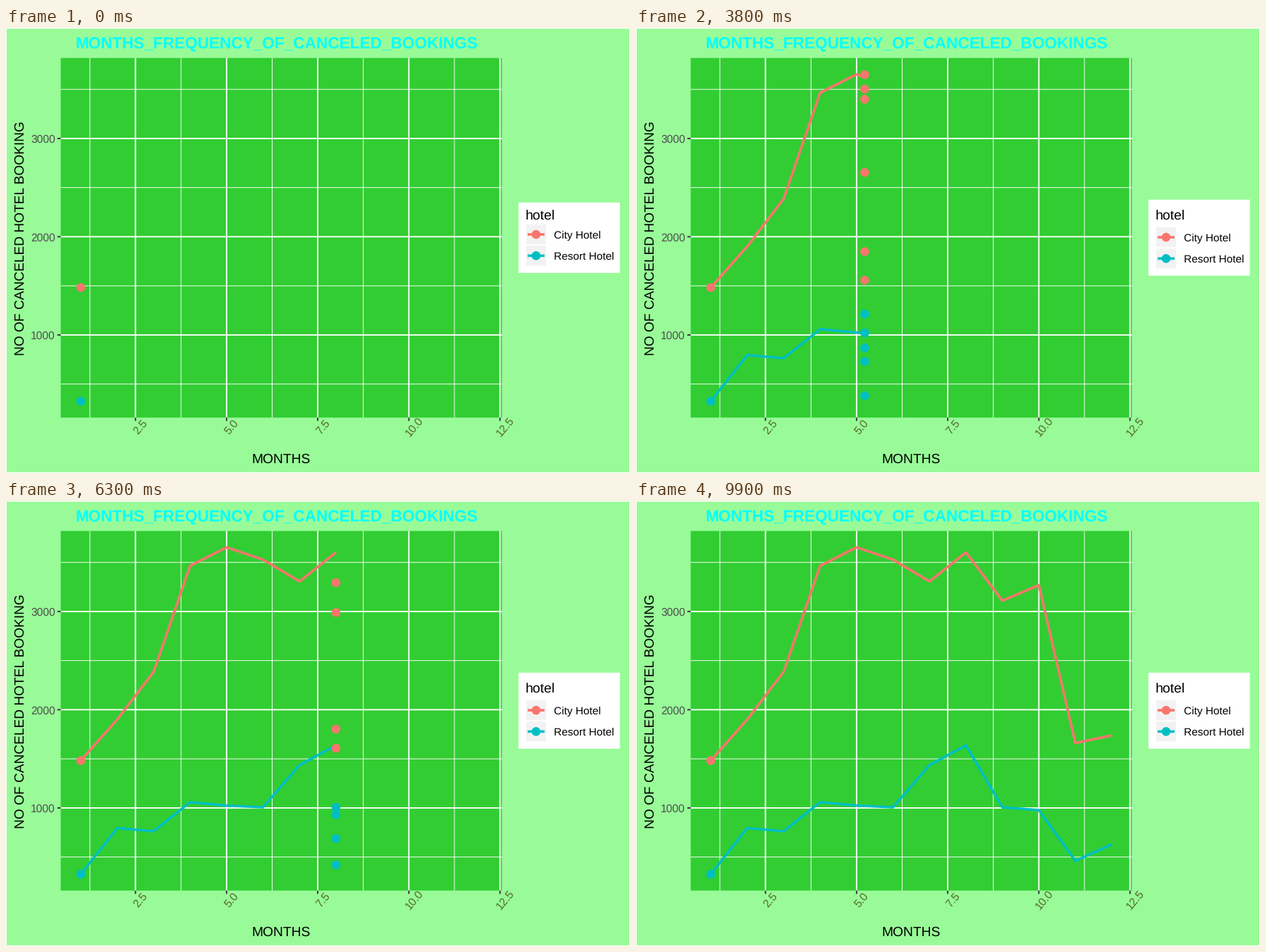
Animation of 885 by 632 pixels, one loop 10 s. Source, as a matplotlib script:

```python
import numpy as np
import matplotlib.pyplot as plt
from matplotlib.animation import FuncAnimation
from matplotlib.patches import PathPatch, Rectangle
from matplotlib.path import Path

W, H, DPI = 885, 632, 100
PT = 72 / DPI
FRAMES, INTERVAL = 100, 100

SERIES = {
    "City Hotel": ("#F8766D", [1482, 1901, 2386, 3465, 3653, 3528,
                               3306, 3602, 3110, 3268, 1661, 1738]),
    "Resort Hotel": ("#00BFC4", [325, 795, 763, 1059, 1024, 1007,
                                 1436, 1637, 1006, 978, 461, 629]),
}
MONTHS = np.arange(1, 13)
LEFT, RIGHT, TOP, BOTTOM = 77.6, 703.2, 42.6, 553.3
MAJOR, MINOR = 1.87, 0.94
LINE_W, DOT_R = 3.6, 6.3

plt.rcParams["font.family"] = "Liberation Sans"
plt.rcParams["text.hinting"] = "none"


def px(month):
    return LEFT + (np.asarray(month) - 0.45) * (RIGHT - LEFT) / 12.1


def py(count):
    return BOTTOM - (np.asarray(count) - 158.6) * (BOTTOM - TOP) / 3660.8


fig = plt.figure(figsize=(W / DPI, H / DPI), dpi=DPI, facecolor="#98FB98")
ax = fig.add_axes([0, 0, 1, 1])
ax.set_xlim(0, W)
ax.set_ylim(H, 0)
ax.axis("off")


def line(xs, ys, color, width, z):
    return ax.plot(xs, ys, color=color, lw=width * PT, zorder=z, snap=False,
                   solid_capstyle="butt", solid_joinstyle="round")[0]


def circles(xs, ys):
    return Path.make_compound_path(
        *[Path.circle((x, y), DOT_R) for x, y in zip(xs, ys)])


def dots(color, z):
    return ax.add_patch(PathPatch(circles([0], [0]), fc=color, lw=0,
                                  zorder=z, snap=False))


def rect(x, y, w, h, color, z, edge="none", width=0):
    return ax.add_patch(Rectangle((x, y), w, h, fc=color, ec=edge,
                                  lw=width * PT, zorder=z, snap=False))


def label(x, y, s, size, color="black", **kw):
    return ax.text(x, y, s, fontsize=size * PT, color=color, va="baseline",
                   rotation_mode="anchor", zorder=9, **kw)


def draw_panel():
    rect(0, 0, W, H, "none", 0, "white", 2)
    rect(LEFT, TOP, RIGHT - LEFT, BOTTOM - TOP, "#32CD32", 1)
    for m in np.arange(1.25, 12, 2.5):
        line([px(m)] * 2, [TOP, BOTTOM], "white", MINOR, 2)
    for c in (500, 1500, 2500, 3500):
        line([LEFT, RIGHT], [py(c)] * 2, "white", MINOR, 2)
    tilt = np.radians(50)
    for m in np.arange(2.5, 13, 2.5):
        x = px(m)
        line([x, x], [TOP, BOTTOM], "white", MAJOR, 3)
        line([x, x], [BOTTOM, BOTTOM + 4.8], "#333333", MAJOR, 3)
        label(x + 6.7 + 5.5 * np.sin(tilt), 565.8 + 5.5 * np.cos(tilt),
              f"{m:.1f}", 15.8, "#556B2F", rotation=50, ha="center")
    for c in (1000, 2000, 3000):
        y = py(c)
        line([LEFT, RIGHT], [y, y], "white", MAJOR, 3)
        line([LEFT - 4.8, LEFT], [y, y], "#333333", MAJOR, 3)
        label(70, y + 6.2, str(c), 15.6, "#4D4D4D", ha="right")
    label(384.2, 28.5, "MONTHS_FREQUENCY_OF_CANCELED_BOOKINGS", 22.6,
          "#00FFFF", weight="bold", ha="center")
    label(390.5, 618, "MONTHS", 19.3, ha="center")
    label(25.5, 298.5, "NO OF CANCELED HOTEL BOOKING", 19.2,
          rotation=90, ha="center")
    label(736.5, 271.5, "hotel", 19.4)


def make_legend():
    box = rect(726.8, 248, 143.8, 100, "white", 4)
    keys = []
    for name, (color, _) in SERIES.items():
        keys.append((
            rect(736.8, 0, 30, 30, "#F2F2F2", 5, "white", MAJOR),
            line([739.8, 763.8], [0, 0], color, LINE_W, 6),
            dots(color, 7),
            label(776.8, 0, name, 15.4),
        ))
    return box, keys


def place_legend(grow):
    box.set_y(247.8 - grow)
    box.set_height(100 + 2 * grow)
    for i, (key, bar, dot, text) in enumerate(keys):
        y = 293.2 + grow + 30.2 * i
        key.set_y(y - 15)
        bar.set_ydata([y, y])
        dot.set_path(circles([751.8], [y]))
        text.set_y(y + 6.1)


def crossings(counts, step):
    """Where the path through the months, ordered by count, meets the sweep."""
    now = 1 + step / 9
    order = np.argsort(counts)
    hits = []
    for a, b in zip(order[:-1], order[1:]):
        lo, hi = sorted((a, b))
        if 9 * lo < step < 9 * hi:
            hits.append(np.interp(now, [lo + 1, hi + 1],
                                  [counts[lo], counts[hi]]))
    return hits


draw_panel()
box, keys = make_legend()
paths = [line([], [], color, LINE_W, 4) for color, _ in SERIES.values()]
marks = [dots(color, 5) for color, _ in SERIES.values()]


def update(step):
    now = 1 + step / 9
    place_legend(4 if step else 0)
    for (_, counts), path, mark in zip(SERIES.values(), paths, marks):
        past = MONTHS[MONTHS < now]
        xs = np.append(past, now)
        path.set_data(px(xs), py(np.interp(xs, MONTHS, counts)))
        path.set_visible(step > 0)
        hits = crossings(counts, step)
        mark.set_path(circles(px([1] + [now] * len(hits)),
                              py([counts[0]] + hits)))
    return paths + marks


anim = FuncAnimation(fig, update, frames=FRAMES, interval=INTERVAL,
                     repeat=True, repeat_delay=0, blit=False)
plt.show()
```
